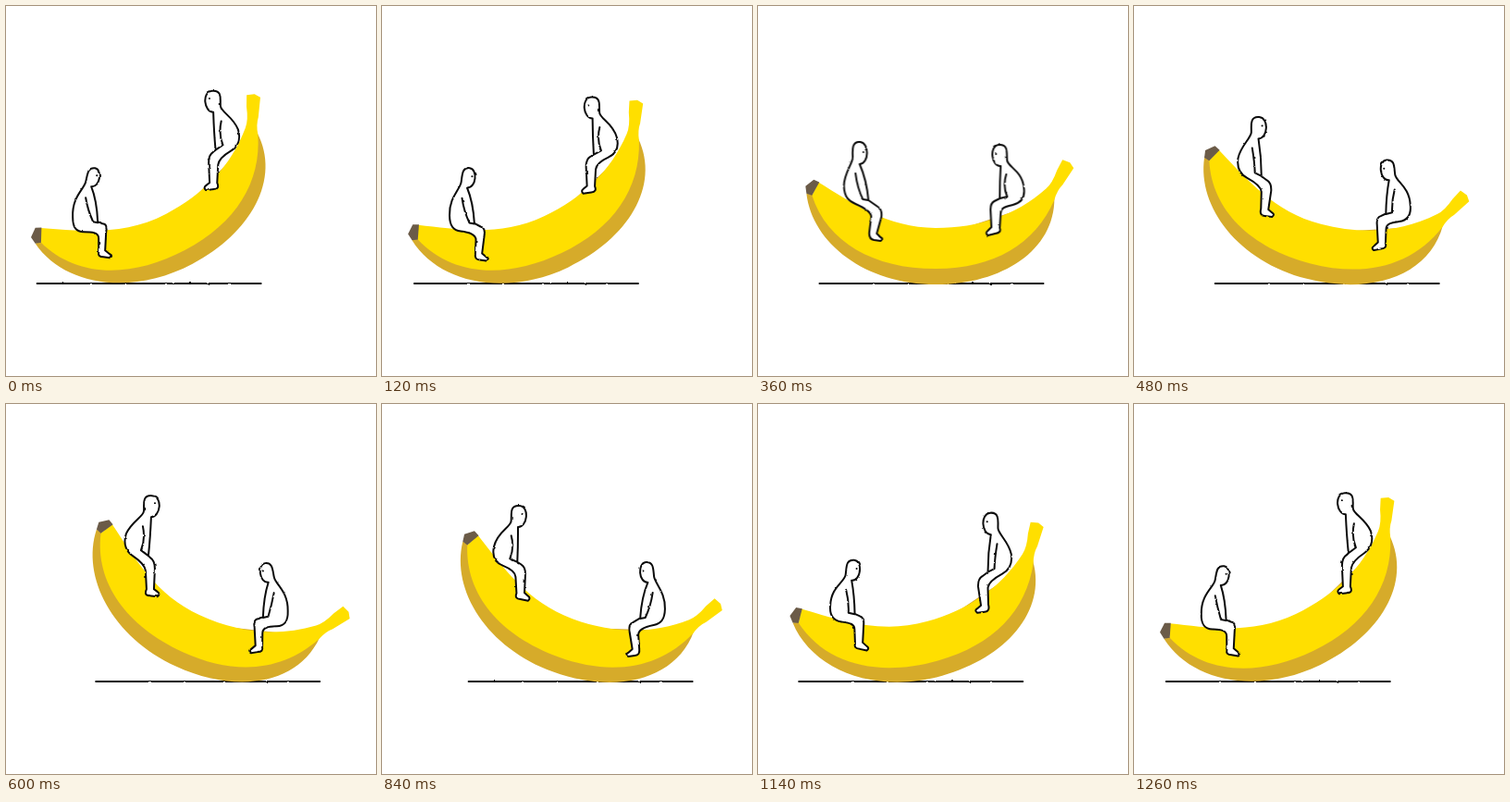
An HTML page without scripts for the animation above (1.32 s loop, 400 by 400 pixels).

```html
<!DOCTYPE html>
<html lang="en">
<head>
<meta charset="utf-8">
<title>Banana seesaw</title>
<style>
  @property --t { syntax: "<angle>"; inherits: true; initial-value: 0deg; }

  html, body { margin: 0; height: 100%; overflow: hidden; background: #fff; }

  svg {
    display: block;
    width: 100vw;
    height: 100vh;
    --a: calc(var(--t) - 7.5deg);
    --c: cos(var(--a));
    --s: sin(var(--a));
    --tilt: calc((-.6 - 27.5 * var(--c)) * 1deg);
    animation: swing 1.32s steps(22) -2ms infinite;
  }
  @keyframes swing { to { --t: 360deg; } }

  .ink {
    fill: #fff;
    stroke: #0b0b0b;
    stroke-width: 2;
    stroke-linecap: round;
    stroke-linejoin: round;
    filter: url(#rough);
  }

  .ground { transform: translateX(calc((66 - 35 * var(--c) + 2.5 * cos(3 * var(--a))) * 1px)); }

  .seesaw { transform: translate(calc((191 - 79.5 * var(--c)) * 1px), 109.5px) rotate(var(--tilt)); }

  /* Sitters ride the banana but stay upright. */
  .left { transform: translate(-97px, 100px) rotate(calc(-1 * var(--tilt))); }
  .right {
    transform: translate(calc((94.5 + 4 * var(--c) - 3.5 * var(--s)) * 1px), 101px)
      rotate(calc(-1 * var(--tilt))) scaleX(-1);
  }

  .sitter { animation: sit 1.32s -2ms infinite; }
  .right .sitter { animation-delay: -662ms; }

  @keyframes sit {
    0%, 100% { /* low */
      d: path("M19 -48C29 -47 31 -67 23 -68S15 -61 13 -53S-2 -37 -1 -15C-1 -3 3 1 11 1S27 1 27 8L27 23Q26 28 32 28L39 29Q43 27 39 25L34 21L35 2Q37 -8 31 -8L26 -10Q25 -33 19 -48ZM13 -36Q15 -23 21 -10L26 -9M25 -60L25.1 -60");
      animation-timing-function: steps(6);
    }
    27.2727% { /* rising */
      d: path("M14.5 -39C25 -40 25 -62 15 -63S7 -52 7 -46S-3 -28 -2.5 -15C-2 -3 3 1 10 4S27 12 27 18L25 34Q24 42 30 43L37 44Q41 42 37 40L33 36L38 18Q39 10 34 7L24 0Q22 -22 14.5 -39ZM10 -29Q12 -13 18 -1L24 0M18.5 -52L18.6 -52");
      animation-timing-function: steps(4);
    }
    45.4545% { /* high */
      d: path("M23 -38C33 -38 36 -60 24 -61S16 -50 15 -44S2 -33 -4 -20C-8 -8 -3 0 3 4S16 14 17 20L18 40Q15 47 21 47L30 48Q33 45 30 43L26 40L27 18Q27 9 22 6L20 4Q22 -15 23 -38ZM14 -28Q17 -14 12 -2L20 4M27 -53L27.1 -53");
      animation-timing-function: steps(7);
    }
    77.2727% { /* falling */
      d: path("M21 -37C31 -36 34 -59 23 -60S15 -50 14 -43S-2 -32 -4 -14C-6 -2 0 3 8 5S21 8 21 14L22 30Q20 35 27 36L35 38Q38 35 35 33L31 29L32 10Q32 3 28 1L22 -2Q22 -20 21 -37ZM15 -28Q19 -16 14 -4L22 -2M26 -50L26.1 -50");
      animation-timing-function: steps(5);
    }
  }
</style>
</head>
<body>
<svg viewBox="0 0 400 400">
  <filter id="rough" filterUnits="userSpaceOnUse" x="-100" y="-100" width="500" height="500" color-interpolation-filters="sRGB">
    <feTurbulence type="fractalNoise" baseFrequency=".16" numOctaves="2" seed="4"/>
    <feDisplacementMap in="SourceGraphic" scale="2" xChannelSelector="R" yChannelSelector="G"/>
  </filter>

  <g class="ground"><path class="ink" d="M0 300H242"/></g>

  <g class="seesaw">
    <g transform="translate(-194 -109.5)">
      <path fill="#d6ab2a" d="M54 202C60 256 118 301 194 301C265 301 322 265 322 208L194 250L60 203Z"/>
      <path fill="#ffdf00" d="M60 204C76 255 127 284 194 284C256 284 301 258 322 210Q325 200 331 194L343 176L339 170L331 167L325 178Q320 192 313 198C280 227 240 240 194 240C142 240 104 213 67 190Z"/>
      <path fill="#6b5b48" d="M53 194L62 187L68 190L60 204L54 202Z"/>
    </g>
    <g class="left"><path class="ink sitter"/></g>
    <g class="right"><path class="ink sitter"/></g>
  </g>
</svg>
</body>
</html>
```
